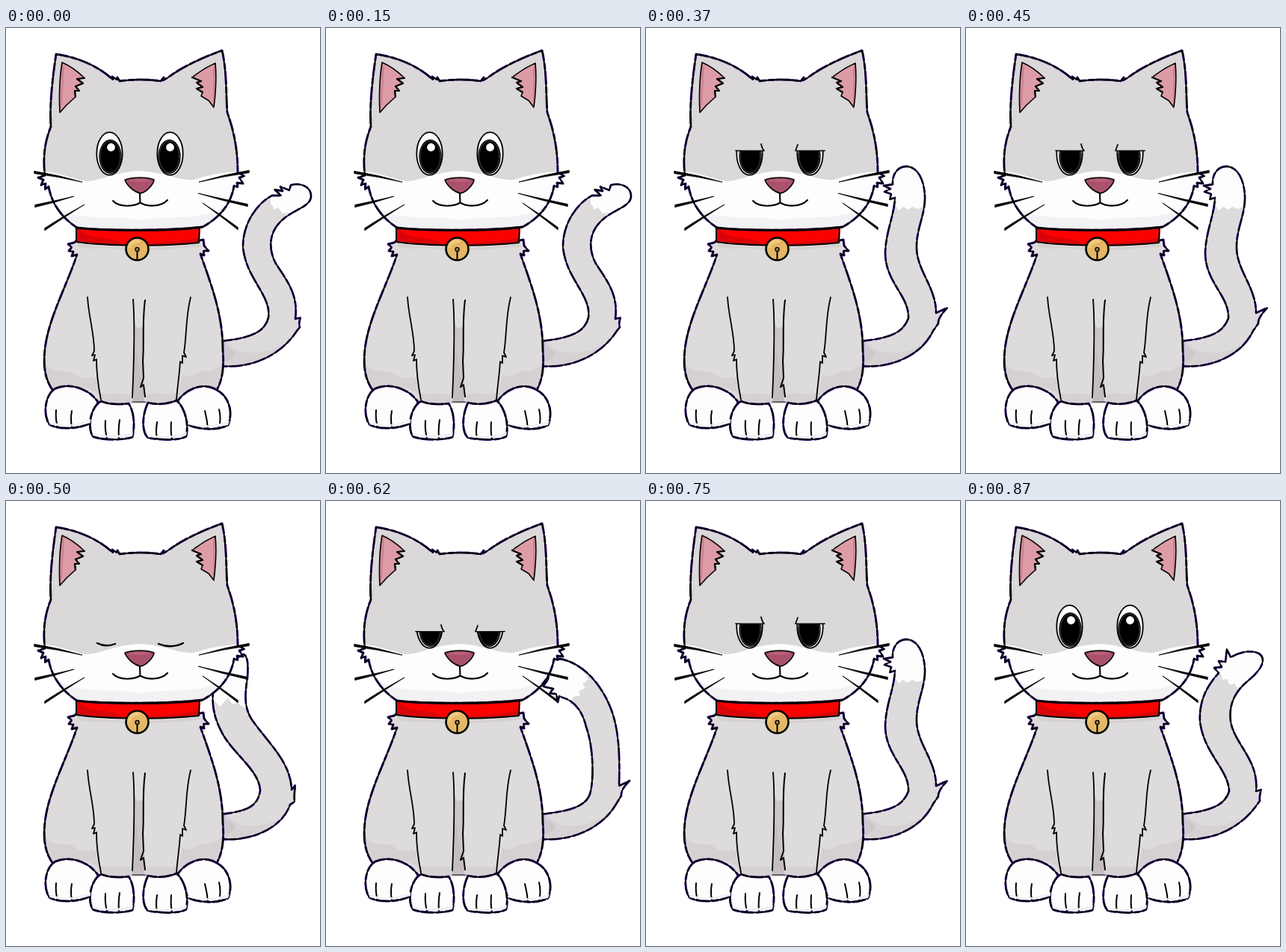
Write an HTML page that moves like this. It is 420 px wide and 595 px high and loops after 1000 ms.

```html
<!DOCTYPE html>
<html lang="en">
<head>
<meta charset="utf-8">
<title>Cat</title>
<style>
  html, body { margin: 0; width: 100%; height: 100%; overflow: hidden; background: #fff; }
  svg { display: block; width: 100%; height: 100%; }
</style>
</head>
<body>
<svg id="stage" viewBox="0 0 420 595" fill="none" stroke-linecap="round" stroke-linejoin="round"></svg>
<script>
const FUR = '#dddbdc', HEAD = '#dad8d9', SHADE = '#d5d1d3', WHITE = '#fdfdfe', FRINGE = '#3c0a96';
const FRINGE_DASH = 'stroke-dasharray="16 5 7 4"';

const fill = (d, color, extra = '') => `<path d="${d}" fill="${color}" ${extra}/>`;
const line = (d, w = 1.8) => `<path d="${d}" stroke="#000" stroke-width="${w}"/>`;
const outline = (d, w = 2, color = 'none') =>
  `<path d="${d}" fill="${color}" stroke="${FRINGE}" stroke-width="${w + 1}" ${FRINGE_DASH}/>` + line(d, w);

// Tapered hair: thick at the outer end, pointed at the inner end
function whisker(x1, y1, x2, y2, bend) {
  const mx = (x1 + x2) / 2, my = (y1 + y2) / 2 + bend;
  return fill(`M${x1},${y1 - 1.6} Q${mx},${my - 1.2} ${x2},${y2} Q${mx},${my + 1.2} ${x1},${y1 + 1.6}Z`, '#000',
    'stroke="#000" stroke-width=".8"');
}

function eye(cx, pupilX, shineX) {
  return `<ellipse cx="${cx}" cy="168" rx="17.2" ry="28.6" fill="#fff" stroke="#000" stroke-width="1.8"/>
    <ellipse cx="${pupilX}" cy="172" rx="15.2" ry="23" fill="#000"/>
    <ellipse cx="${pupilX}" cy="172" rx="13.6" ry="21.2" stroke="#5b595f" stroke-width=".8"/>
    <circle cx="${shineX}" cy="159.5" r="5.4" fill="#fff"/>`;
}

// Each tail runs from the body along the inner edge, round the tip and down the outer edge
const tails = {
  right: {
    edge: '346,409 351,387 C355,357 322,337 317,294 C316,262 336,234 356,224 L368,224 L359,216 L370,218 L367,212 L379,217 L381,210 C395,206 409,213 408,226 C406,240 385,242 368,258 C351,274 351,297 361,315 C377,340 391,356 387,389 L394,387 Q391,394 393,400 L389,405',
    tip: 'M354,234 L359,243 L364,240 L370,248 L376,247 L384,254 L420,235 L405,195 L350,205Z'
  },
  upRight: {
    edge: '346,409 352,388 C351,359 318,337 313,295 C311,265 325,244 338,230 L332,223 L342,222 L338,214 L347,215 L349,198 L354,209 C365,203 380,198 392,204 C403,212 394,226 380,238 C361,253 351,270 354,295 C359,325 392,346 388,388 L395,386 Q392,394 393,401 L390,405',
    tip: 'M330,229 L341,231 L343,239 L349,238 L353,246 L359,244 L366,254 L410,225 L395,190 L330,195Z'
  },
  up: {
    edge: '345,409 351,387 C353,360 318,336 314,290 C313,265 325,246 333,235 L324,231 L332,228 L327,222 Q335,214 331,199 L341,208 C343,195 353,186 364,187 C377,190 378,211 374,226 C368,246 356,265 354,288 C355,319 394,342 393,382 L402,374 Q396,385 397,393 L391,405',
    tip: 'M320,232 L333,236 L337,243 L341,239 L347,246 L352,242 L357,249 L372,246 L390,180 L320,180Z'
  },
  upLeft: {
    edge: '343,410 351,388 C352,357 320,341 320,300 C321,270 332,252 333,227 L326,229 L328,222 L319,219 L327,215 L318,211 L330,209 C329,195 337,185 349,185 C363,186 372,202 373,225 C374,250 361,268 362,295 C363,325 388,347 388,381 L403,374 Q390,388 391,395 L384,405',
    tip: 'M310,240 L334,238 L338,244 L344,239 L350,243 L356,239 L363,242 L380,236 L380,175 L310,180Z'
  },
  tucked: {
    edge: '337,409 340,387 C339,360 302,336 289,310 C278,290 274,270 278,248 L299,212 L311,203 L309,210 L317,205 C324,206 324,220 323,236 C319,260 319,276 328,291 C349,322 381,348 382,386 L387,380 Q385,393 386,402 L380,406',
    tip: 'M270,271 L280,268 L286,275 L297,263 L303,272 L309,270 L324,280 L335,195 L270,200Z'
  },
  curled: {
    edge: '350,410 354,388 C358,370 358,330 348,302 C343,281 332,267 317,263 L312,261 L310,269 L308,258 L299,257 L304,251 L290,248 L297,239 L300,212 L313,211 C345,217 368,246 380,275 C393,306 393,346 392,381 L406,374 Q394,386 395,394 L387,407',
    tip: 'M351,238 L343,245 L347,250 L338,254 L340,260 L330,262 L329,275 L285,275 L285,200 L330,205Z'
  }
};

const OPEN = 130, SHUT = 200;
const poses = [
  { from: 0, tail: 'right', lid: OPEN },
  { from: 250, tail: 'up', lid: 152 },
  { from: 370, tail: 'upLeft', lid: 164 },
  { from: 500, tail: 'tucked', lid: SHUT },
  { from: 620, tail: 'curled', lid: 174.5 },
  { from: 750, tail: 'upLeft', lid: 164 },
  { from: 870, tail: 'upRight', lid: OPEN }
];
const LOOP = 1000;

function tailArt() {
  return `<clipPath id="tailClip"><path data-tail=""/></clipPath>
    <path data-tail="" fill="${FUR}"/>
    <g clip-path="url(#tailClip)"><path id="tip" fill="${WHITE}"/>
    ${fill('M285,417 C296,418 302,430 316,433 C332,436 350,434 366,424 L372,440 L285,456Z', '#d6d2d4')}
    ${fill('M285,417 C294,420 300,430 307,435 C303,443 297,447 285,449Z', '#cdc8ca')}</g>
    <path data-tail="" stroke="${FRINGE}" stroke-width="2.8" ${FRINGE_DASH}/>
    <path data-tail="" stroke="#000" stroke-width="1.8"/>`;
}

function bodyArt() {
  const left = 'M95,284 L91,287 L83,289 L88,293 L84,298 L90,299 L88,305 L95,303 C81,345 56,390 52,430 C49,457 54,473 63,485';
  const right = 'M259,284 L264,283 L265,291 L271,298 L264,298 L265,304 L260,302 C274,342 290,382 290,430 C292,456 289,471 282,484';
  return fill('M95,303 C81,345 56,390 52,430 C49,457 54,473 63,485 L130,502 L225,502 L282,484 C289,471 292,456 290,430 C290,382 274,342 260,302 L259,284 L95,284Z', FUR)
    + fill('M83,289 L95,284 L97,303 L88,305 L90,299 L84,298 L88,293Z M259,284 L264,283 L265,291 L271,298 L264,298 L265,304 L257,302Z', FUR)
    + fill('M96,288 C140,296 215,296 259,288 L260,292 C225,296 205,296 188,298 L160,297 C135,292 110,298 96,292Z', SHADE)
    + fill('M53,449 C66,466 83,454 92,463 C102,471 110,466 120,468 L124,490 C108,478 80,474 63,485 C56,474 51,460 53,449Z', SHADE)
    + fill('M289,449 C274,464 262,454 252,464 C246,469 240,465 236,463 L231,492 C245,481 265,474 282,484 C289,472 291,460 289,449Z', SHADE)
    + fill('M125,487 C138,493 150,485 169,491 L169,502 L128,500Z M187,491 C201,485 215,493 231,487 L228,500 L188,502Z', SHADE)
    + fill('M171,390 C176,410 180,395 184,402 L185,500 L169,500C171,465 172,425 171,390Z', '#cdc5c8')
    + fill('M171,425 C177,440 176,462 184,470 L185,500 L169,500Z', '#c6bdc0')
    + outline(left) + outline(right);
}

function legArt() {
  const paws = [
    ['M66,482 C52,490 49,517 58,530 C69,537 96,537 114,528 L123,500 C112,484 88,473 66,482Z', 'M67,511 Q66,523 69,534 M88,512 Q86,523 88,533'],
    ['M282,484 C264,473 242,482 230,498 L243,530 C259,538 284,538 297,531 C304,515 299,493 282,484Z', 'M266,512 Q269,524 270,535 M285,510 Q288,522 285,534'],
    ['M127,499 C112,508 109,535 116,546 C130,552 157,551 169,547 C173,531 171,512 164,502 C151,504 137,503 127,499Z', 'M133,525 Q132,537 135,548 M152,524 Q150,537 151,548'],
    ['M190,501 C182,517 181,540 190,548 C208,551 232,552 241,546 C245,529 239,507 228,498 C216,503 202,504 190,501Z', 'M202,527 Q200,540 202,549 M221,527 Q220,540 222,549']
  ];
  const paw = ([shape, toes]) => outline(shape, 2, WHITE) + line(toes, 2);
  return paws.map(paw).join('')
    + fill('M60,526 Q84,536 113,523 L113,528 Q84,536 58,530Z M243,528 Q270,536 299,525 L297,531 Q270,537 243,530Z M116,542 Q145,549 170,540 L169,546 Q145,549 116,545Z M189,543 Q215,550 242,540 L241,545 Q215,550 190,547Z', '#f0f0f3')
    + line('M109,360 C111,389 118,407 118,432 L115,438 L119,437 L117,445 L121,443 C121,463 124,482 127,497')
    + line('M247,360 C240,387 242,410 238,434 L241,440 L236,438 L236,448 L233,446 C232,464 229,482 228,497')
    + line('M170,363 C173,400 171,450 169,494')
    + line('M186,364 C182,392 185,420 183,445 L184,468 L180,480 L184,477 L186,493', 2)
    + line('M169,500 L187,500', 1.2);
}

function collarArt() {
  const band = 'M94,267 C140,271 215,272 259,267 L258,287 C215,292 135,292 94,286Z';
  return fill(band, '#fb0202')
    + fill('M94,267 L99,270 C106,278 124,281 146,283 L158,290 C135,290 112,289 94,285Z M194,287 Q228,287 258,280 L258,287 C236,290 212,291 192,291Z', '#d80408')
    + line(band, 2)
    + `<circle cx="175.5" cy="295.5" r="15" fill="#e5b765" stroke="#000" stroke-width="2.6"/>
      <path d="M165,293 Q168,284 178,285" stroke="#eecb86" stroke-width="3.5"/>
      <circle cx="175.5" cy="296" r="2.6" fill="#9a7d4c" stroke="#000" stroke-width="1.3"/>`
    + line('M175.5,299 L175.5,309', 2);
}

function headArt() {
  const shape = 'M67,35 C95,39 122,50 143,69 L142,65 L148,69 L149,66 L152,71 Q180,67 207,71 L211,66 L210,70 L217,66 C237,51 262,40 289,30 C296,60 294,91 296,113 C304,135 310,160 310,193 L319,198 L312,200 L317,208 L309,207 L310,213 L305,211 C301,236 285,254 263,266 C220,271 130,272 95,267 C75,254 61,235 57,212 L52,216 L53,208 L47,210 L50,203 L43,200 L52,197 C49,172 52,151 60,132 C58,102 62,69 67,35Z';
  const ears = 'M75,46 C71,70 71,94 72,113 L81,103 L93,92 L92,84 L98,84 L93,78 L103,74 L95,68 L105,67 Q91,53 75,46Z M280,47 C282,68 280,90 278,106 L271,97 L261,91 L263,86 L255,81 L263,79 L255,73 L261,71 L249,66 Q264,54 280,47Z';
  return `<clipPath id="headClip"><path d="${shape}"/></clipPath>` + fill(shape, HEAD)
    + `<g clip-path="url(#headClip)">`
    + fill('M40,191 C70,192 88,201 106,205 C126,205 142,193 178,191 C214,193 230,204 250,203 C266,199 282,192 322,192 L322,278 L40,278Z', WHITE)
    + fill('M70,241 C105,260 140,249 178,257 C218,250 252,259 292,240 L270,278 L90,278Z', '#f2f1f4')
    + '</g>'
    + fill(ears, '#dd9ba6')
    + fill('M75,48 L78,51 L75,101 L72,112Z M280,48 L277,52 L277,98 L278,105Z', '#cb8490')
    + line(ears, 1.6) + outline(shape, 2)
    + line('M94,267 C130,271 220,272 263,266', 3)
    + line('M60,132 L60,120 M152,71 Q180,67 207,71 M105,67 L95,68 L103,74 L93,78 L98,84 L92,84 L93,92 M249,66 L261,71 L255,73 L263,79 L255,81 L263,86', 2.2);
}

function faceArt() {
  const nose = 'M159,203 C169,199 190,199 198,203 C197,210 187,220 180,221 C171,219 162,211 159,203Z';
  return `<clipPath id="lidClip"><rect id="lidBox" x="100" width="160" height="90"/></clipPath>
    <g id="eyes" clip-path="url(#lidClip)">${eye(138.5, 139.5, 140.5)}${eye(219.5, 218.5, 219.5)}</g>
    <path id="lids" stroke="#000"/>`
    + fill(nose, '#aa526b') + fill('M164,204 C175,202 188,202 193,204 Q180,207 164,204Z', '#b7647b') + line(nose, 1.7)
    + line('M179,221 L179.5,234 M143,231 C151,240 171,239 179.5,233.5 C188,239 207,240 216,230', 2.1)
    + whisker(38, 193, 102, 206, -2) + whisker(39, 238, 91, 225, 1) + whisker(52, 269, 105, 236, -1)
    + whisker(325, 192, 258, 206, -2) + whisker(323, 237, 257, 221, 1) + whisker(310, 268, 263, 234, -1);
}

const stage = document.getElementById('stage');
stage.innerHTML = tailArt() + bodyArt() + legArt() + collarArt() + headArt() + faceArt();

const byId = id => document.getElementById(id);
const tailPaths = stage.querySelectorAll('[data-tail]');
const tip = byId('tip'), eyes = byId('eyes'), lids = byId('lids'), lidBox = byId('lidBox');

function lidPath(y) {
  if (y === OPEN) return '';
  if (y === SHUT) return 'M122,190 Q133,196 146,191 M204,191 Q221,198 237,190';
  return `M120,${y} Q138,${y + .6} 158,${y} Q155,${y - 3} 154,${y - 9} M239,${y} Q219,${y + .6} 200,${y} Q201,${y - 3} 203,${y - 8}`;
}

function draw(ms) {
  const t = ms % LOOP;
  const pose = poses.findLast(p => t >= p.from);
  const tail = tails[pose.tail];
  const path = `M286,419 C322,415 ${tail.edge} C371,433 335,456 286,452`;
  tailPaths.forEach(p => p.setAttribute('d', path));
  tip.setAttribute('d', tail.tip);
  lidBox.setAttribute('y', pose.lid);
  eyes.style.display = pose.lid === SHUT ? 'none' : '';
  lids.setAttribute('d', lidPath(pose.lid));
  lids.setAttribute('stroke-width', pose.lid === SHUT ? 2.4 : 1.7);
}

const start = performance.now();
function tick() {
  draw(performance.now() - start);
  requestAnimationFrame(tick);
}
tick();
</script>
</body>
</html>
```
